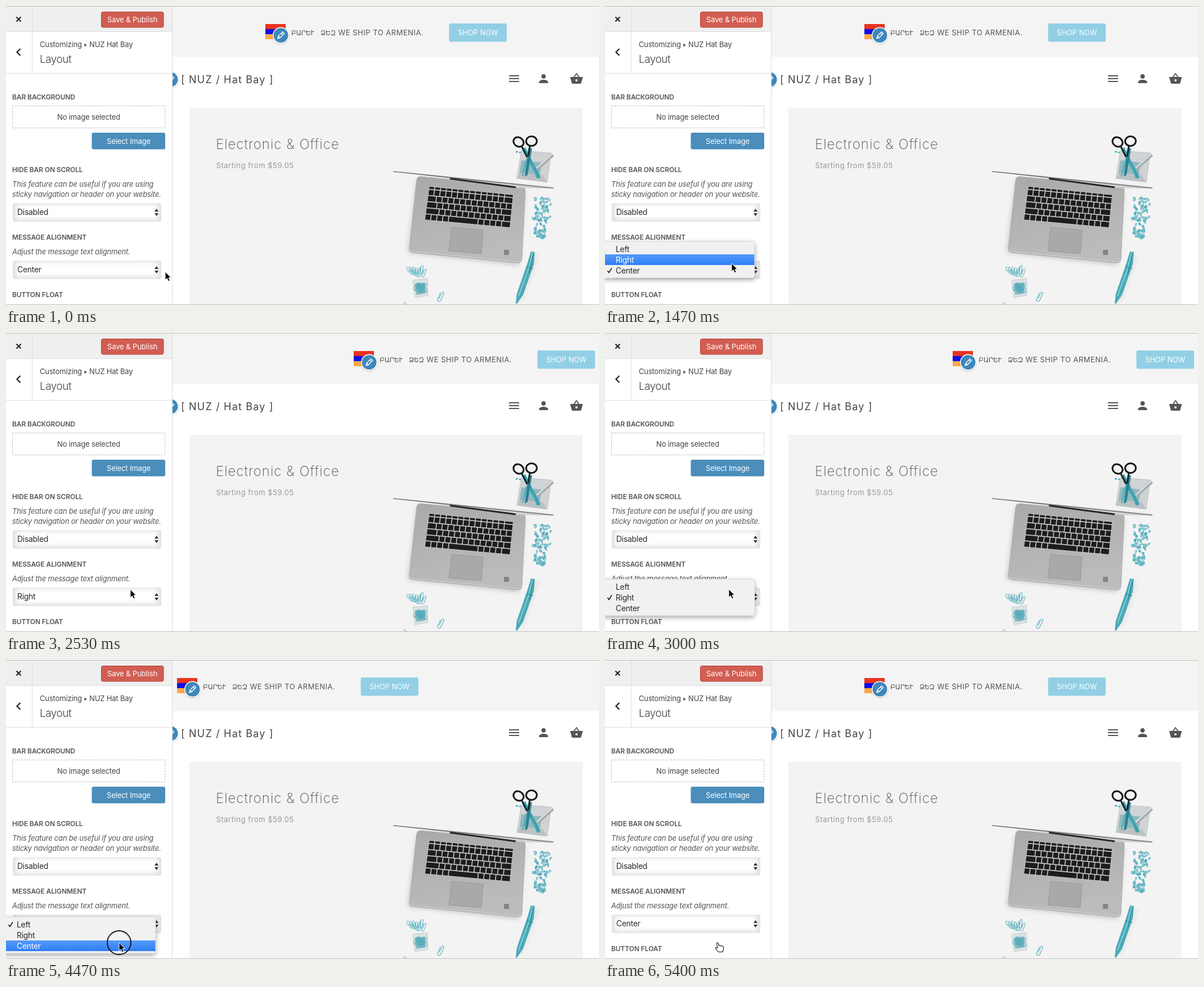
Animation of 1054 by 531 pixels, one loop 5.47 s. Source, as an HTML page:

```html
<!DOCTYPE html>
<html lang="en">
<head>
<meta charset="utf-8">
<title>Message alignment</title>
<style>
html, body { margin: 0; width: 100%; height: 100%; overflow: hidden; background: #fff; }
svg { display: block; width: 1054px; height: 531px; }
text { font: 13px Inter, sans-serif; letter-spacing: -.15px; fill: #444; }
.head { font-size: 12px; font-weight: 600; letter-spacing: -.1px; fill: #555; }
.note { font-style: italic; letter-spacing: -.2px; fill: #555; }
.opt { font-size: 14px; letter-spacing: -.3px; fill: #2b2b2b; }
.hy { font: 12px 'DejaVu Sans', sans-serif; fill: #555; }
.mid { text-anchor: middle; }
.white { fill: #fff; }
.line { fill: none; stroke: #ddd; }
.teal { fill: none; stroke: #48a9b8; }
</style>
</head>
<body>
<svg viewBox="0 0 1054 531">
<defs>
  <linearGradient id="metal" x1="0" y1="0" x2=".3" y2="1">
    <stop offset="0" stop-color="#a9a9a9"/><stop offset="1" stop-color="#bcbcbc"/>
  </linearGradient>
  <linearGradient id="hot" x1="0" y1="0" x2="0" y2="1">
    <stop offset="0" stop-color="#549bfa"/><stop offset="1" stop-color="#2f7df6"/>
  </linearGradient>
  <filter id="soft" x="-30%" y="-60%" width="160%" height="220%"><feGaussianBlur stdDeviation="4"/></filter>
  <filter id="drop" x="-20%" y="-20%" width="140%" height="150%"><feDropShadow dx="0" dy="3" stdDeviation="4" flood-opacity=".35"/></filter>
  <filter id="lift" x="-20%" y="-20%" width="140%" height="150%"><feDropShadow dx="0" dy="1" stdDeviation="1" flood-opacity=".25"/></filter>
  <g id="edit">
    <circle r="14.500" fill="#fff" filter="url(#lift)"/>
    <circle r="13" fill="#3f87bb"/>
    <path d="M-5.500 5.500l1-4L3-6l3 3-7.500 7.500zM1-4l3 3M-4.500 1.500l3 3" fill="none" stroke="#fff" stroke-width="1.400"/>
  </g>
  <g id="select">
    <rect x="12" width="264" height="33" rx="4" fill="#e0e0e0"/>
    <rect x="18" y="2" width="252" height="27" fill="#fff" filter="url(#soft)"/>
    <path d="M264 15l3.500-5 3.500 5zM264 18l3.500 5 3.500-5z" fill="#333"/>
  </g>
  <path id="clip" d="M-3-7v12a3 3 0 0 0 6 0v-13a2 2 0 0 0-4 0v11" fill="none"/>
</defs>

<!-- shop page -->
<rect x="296" width="758" height="90.500" fill="#f4f4f4"/>
<g id="bar">
  <path d="M461 32h36v9h-36z" fill="#e8331f"/>
  <path d="M461 41h36v9h-36z" fill="#1010e4"/>
  <path d="M461 50h36v9h-36z" fill="#f9a94a"/>
  <use href="#edit" x="488.500" y="52"/>
  <text class="hy" x="507" y="51.500">ԲԱՐԵՒ</text>
  <text class="hy" x="559" y="51.500">ՁԵԶ</text>
  <text x="590.500" y="51.500" style="letter-spacing:.5px;fill:#555">WE SHIP TO ARMENIA.</text>
  <rect x="787.500" y="31" width="102.500" height="32.500" rx="3" fill="#92cfe5"/>
  <text class="mid white" x="839" y="51.500" style="font-size:12.500px;letter-spacing:.2px">SHOP NOW</text>
</g>
<use href="#edit" x="292.500" y="130.500"/>
<text x="311" y="137" style="font-size:18px;letter-spacing:1.200px">[ NUZ / Hat Bay ]</text>
<g fill="#555">
  <path d="M894 123h18v2h-18zm0 5h18v2h-18zm0 5h18v2h-18z"/>
  <path transform="translate(943.500 117)" d="M12 12c2.210 0 4-1.790 4-4s-1.790-4-4-4-4 1.790-4 4 1.790 4 4 4zm0 2c-2.670 0-8 1.340-8 4v2h16v-2c0-2.660-5.330-4-8-4z"/>
  <path transform="translate(1002 117)" fill-rule="evenodd" d="M17.200 9L12.800 2.400q-.8-.8-1.600 0L6.800 9H2q-1.200.2-1 1.300l2.600 9.200q.5 1.500 1.900 1.500h13q1.400 0 1.900-1.500L23 10.300Q23.200 9.200 22 9zM9 9l3-4.400L15 9zm3 8a2 2 0 1 1 0-4 2 2 0 0 1 0 4z"/>
</g>
<rect x="326" y="181" width="699" height="350" fill="#f3f3f3"/>
<text x="373" y="253.500" style="font-size:24px;font-weight:200;letter-spacing:1px;fill:#555">Electronic &amp; Office</text>
<text x="373.500" y="288" style="letter-spacing:.55px;fill:#999">Starting from $59.05</text>

<!-- desk picture -->
<path d="M730 310L714 438 911 460 922 330z" fill="#c4c4c4" filter="url(#soft)"/>
<path d="M738 303L918 321Q923 322 923 328L917 450Q916 457 909 456L724 438Q716 437 717 430L730 309Q731 302 738 303Z" fill="url(#metal)" stroke="#a0a0a0" stroke-width=".7"/>
<path d="M718 432q1 4 6 4l185 18q6 0 7-5" fill="none" stroke="#d4d4d4"/>
<path d="M752 320L902 335 896 394 744 380Z" fill="#c2c2c2"/>
<path id="keys" fill="#1d1d1f"/>
<path d="M792 393L848 398 845 440 787 435Z" fill="#a9a9a9" stroke="#949494" stroke-width=".8"/>
<rect x="885" y="433" width="9" height="9" fill="#858585"/>
<path d="M687 293.500L691 293 973 321.500 972 324.500 910 323 780 306Z" fill="#cfcfcf"/>
<path d="M688 294L973 323.500" stroke="#555" stroke-width="1.200"/>
<path d="M789 306.500L906 322" stroke="#262626" stroke-width="3"/>

<path d="M916 257L969 261 962 313 908 306Z" fill="#d0d3d5" stroke="#bfc3c5"/>
<path d="M916 274l36 4-4 28-36-4z" fill="#8fb9bf"/>
<path d="M908 306l54 7-8-13-38-4z" fill="#bcc2c4"/>
<path d="M943 290L972 264" stroke="#a5a9ab" stroke-width="6"/>
<path d="M943 288L972 262" stroke="#d9dbdc" stroke-width="2.500"/>
<path d="M917 254l6-3 27 53-4 3z" fill="#38a0b0"/>
<path d="M929 252l6 1-8 47-5 3z" fill="#2a8292"/>
<path d="M934 276l10 30M925 272l-7 30" class="teal" stroke-width="2"/>
<path d="M917 250l9 18M931 249l-3 18" stroke="#15262b" stroke-width="3"/>
<g fill="none" stroke="#16181a" stroke-width="3">
  <ellipse cx="911" cy="241.500" rx="9.500" ry="8" transform="rotate(35 911 241.500)"/>
  <ellipse cx="934" cy="240" rx="9.500" ry="8.500" transform="rotate(-5 934 240)"/>
</g>
<path d="M906 259h4m2 1h3" class="teal" stroke-width="2.500"/>
<g id="pile" class="teal" stroke-width="1.100"></g>

<path d="M943 442L914 522" stroke="#d8d8d8" stroke-width="5" filter="url(#soft)"/>
<path d="M933 436l7 1-2 22-19 54-11 16-2-1 2-17 19-55z" fill="#4aaab8"/>
<path d="M936 438L929 466 911 515" fill="none" stroke="#9bd6dd" stroke-width="1.500"/>
<path d="M937 440l-7 34M926 463l11 4" stroke="#2a8290" stroke-width="1.200"/>

<path d="M723 487l26-3 1 30-23 4z" fill="#dbe2e4" stroke="#c3cdd0"/>
<path d="M727 493l18-2 1 19-17 3z" fill="#86b9c2"/>
<g id="clips" class="teal"></g>

<!-- settings panel -->
<path d="M0 0h295v531H0z" fill="#fff"/>
<path d="M0 0h295v45H0z" fill="#efefef"/>
<path class="line" d="M295.500 0v531M0 45.500h295M0 119.500h295M46.500 0v119"/>
<path d="M18.500 19.500l8 8m0-8l-8 8M25.500 76l-6 6 6 6" fill="none" stroke="#222" stroke-width="2.200"/>
<rect x="169.500" y="10.500" width="110.500" height="27.500" rx="3" fill="#d25d52" stroke="#b5443a"/>
<text class="mid white" x="224.500" y="28.500" style="letter-spacing:-.1px">Save &amp; Publish</text>
<text x="60" y="73">Customizing</text>
<path d="M139.500 66.500l4 3-4 3z" fill="#444"/>
<text x="148" y="73">NUZ Hat Bay</text>
<text x="60" y="101" style="font-size:19px;font-weight:300;letter-spacing:-.5px">Layout</text>
<text class="head" x="11" y="165.500">BAR BACKGROUND</text>
<rect x="11.500" y="177.500" width="271.500" height="39" fill="none" stroke="#b4b9be" stroke-dasharray="3 2"/>
<text class="mid" x="147" y="202">No image selected</text>
<rect x="152.500" y="225" width="130.500" height="29.500" rx="3" fill="#4b8dbb"/>
<text class="mid white" x="218" y="244.500">Select Image</text>
<text class="head" x="11" y="295">HIDE BAR ON SCROLL</text>
<text class="note" x="11" y="321">This feature can be useful if you are using</text>
<text class="note" x="11" y="339">sticky navigation or header on your website.</text>
<use href="#select" y="350"/>
<text class="opt" x="20" y="371">Disabled</text>
<text class="head" x="11" y="415">MESSAGE ALIGNMENT</text>
<text class="note" x="11" y="440.500">Adjust the message text alignment.</text>
<use href="#select" y="452"/>
<text class="opt" id="value" x="20" y="473"></text>
<text class="head" x="11" y="517">BUTTON FLOAT</text>
<path d="M0 .5h1054M0 530.500h1054" stroke="#bdbdbd"/>

<g id="menu">
  <path d="M-10 0H261q5 0 5 5v55q0 5-5 5H-10z" fill="#f1f1f1" stroke="#c4c4c4" stroke-width=".6" filter="url(#drop)"/>
  <rect id="hover" width="265.500" height="19" fill="url(#hot)"/>
  <path id="tick" d="M4.500 14l2.500 3.500 5-8" fill="none" stroke-width="1.700"/>
</g>
<circle id="ring" r="21" fill="none" stroke="#111" stroke-width="1.800"/>
<g id="cursor" stroke="#fff" stroke-linejoin="round">
  <path id="arrow" d="M0 0V14.500L3.300 11.500 5.700 16.800 8.300 15.700 6 10.500H10.300Z" fill="#000"/>
  <path id="hand" transform="translate(2.500 8.500)" fill="#fff" stroke="#111" stroke-width="1.100" d="M-5-6.500C-5.500-8.500-3-9-2.300-7L-1-3C-.5-4.200 1.500-4 2-2.600 2.800-3.800 4.600-3.200 4.800-2 6-2.600 7.200-1.600 7.200 0L7 3.500 5.500 8H-2L-6.500 2.500C-8 .5-6-.8-4.300.6L-3.400 1.200Z"/>
</g>
</svg>
<script>
const LOOP = 5470, ROW = 19;
const names = ['Left', 'Right', 'Center'], shift = [-157, 157, 0];
const $ = id => document.getElementById(id);

function add(parent, tag, attrs, text = '') {
  const el = document.createElementNS('http://www.w3.org/2000/svg', tag);
  for (const k in attrs) el.setAttribute(k, attrs[k]);
  el.textContent = text;
  return parent.appendChild(el);
}

// keyboard: staggered rows over a skewed quad, the first row half as high
const key = (u, v) => [752 + 150 * u - 8 * v + 2 * u * v, 320 + 15 * u + 60 * v - u * v];
const UNITS = 14.5, firstKey = [1, 1, 1.5, 1.75, 2.25, 1];
let d = '';
firstKey.forEach((first, r) => {
  const top = (Math.max(0, r - .5) + .08) / 5.5, bottom = (r + .42) / 5.5;
  for (let x = 0, w = first; x < UNITS; x += w, w = 1) {
    if (r === 5 && x === 4) w = 5;
    if (UNITS - x - w < 1) w = UNITS - x;
    const a = (x + .08) / UNITS, b = (x + w - .08) / UNITS;
    d += `M${key(a, top)}L${key(b, top)} ${key(b, bottom)} ${key(a, bottom)}Z`;
  }
});
$('keys').setAttribute('d', d);

let seed = 11;
const rnd = () => (seed = seed * 16807 % 2147483647) / 2147483647;

// heap of small rings, wide at the top
for (let i = 0; i < 85; i++) {
  const v = rnd(), wide = v < .55 ? 15 : 9;
  const x = 955 - 7 * v + (rnd() * 2 - 1) * wide, y = 341 + 71 * v;
  add($('pile'), 'ellipse', {
    rx: 2.3, ry: 1.2, transform: `translate(${x} ${y}) rotate(${rnd() * 180})`
  });
}

const clip = (x, y, turn, size = .85) => add($('clips'), 'use', {
  href: '#clip', transform: `translate(${x} ${y}) rotate(${turn}) scale(${size})`
});
for (let i = 0; i < 7; i++) clip(718 + i * 4, 476 - rnd() * 9, -45 + i * 11);
for (let i = 0; i < 7; i++) clip(729 + i * 2.5, 498 + rnd() * 7, rnd() * 80 - 40);
clip(772, 517, 25, 1);
clip(712, 532, -50, .7);

const labels = names.map((n, i) =>
  add($('menu'), 'text', { class: 'opt', x: 19, y: 18.5 + i * ROW }, n));

const path = [[0, 283, 472], [120, 283, 472], [600, 238, 472], [950, 238, 472],
  [1350, 225, 457], [2100, 225, 457], [2700, 220, 455], [3820, 220, 455],
  [4320, 201, 502], [LOOP, 201, 502]];
const clicks = [640, 1480, 2770, 3180, 3600, 4400];   // each ring lasts 200 ms
const menus = [[790, 1700, 2], [2960, 3400, 1], [3660, 4620, 0]];   // open, close, checked

// the choice in force at t, given the three switching times
const choice = (t, right, left, center) => t < right || t >= center ? 2 : t < left ? 1 : 0;
const show = (id, on) => $(id).style.display = on ? '' : 'none';
const move = (id, x, y) => $(id).setAttribute('transform', `translate(${x} ${y})`);

function pointer(t) {
  const i = path.findIndex(p => p[0] > t);
  const [t0, x0, y0] = path[i - 1], [t1, x1, y1] = path[i];
  const u = (t - t0) / (t1 - t0), k = u * u * (3 - 2 * u);
  return [x0 + (x1 - x0) * k, y0 + (y1 - y0) * k];
}

function draw(t) {
  const [x, y] = pointer(t);
  move('cursor', x, y);
  move('ring', x, y);
  show('ring', clicks.some(c => t >= c && t < c + 200));
  show('hand', t >= 4620);
  show('arrow', t < 4620);

  move('bar', shift[choice(t, 1900, 3500, 4740)], 0);
  $('value').textContent = names[choice(t, 1700, 3400, 4620)];

  const open = menus.find(m => t >= m[0] && t < m[1]);
  show('menu', open);
  if (!open) return;
  const [start, , checked] = open, top = 456 - checked * ROW;
  const row = Math.max(0, Math.min(2, Math.floor((y - top - 4) / ROW)));
  const hot = t - start >= 60 ? row : -1;
  move('menu', 0, top);
  show('hover', hot >= 0);
  $('hover').setAttribute('y', 4 + hot * ROW);
  move('tick', 0, checked * ROW);
  $('tick').setAttribute('stroke', hot === checked ? '#fff' : '#222');
  labels.forEach((l, i) => l.style.fill = i === hot ? '#fff' : '');
}

const begin = performance.now();
function frame() {
  draw((performance.now() - begin) % LOOP);
  requestAnimationFrame(frame);
}
frame();
</script>
</body>
</html>
```
